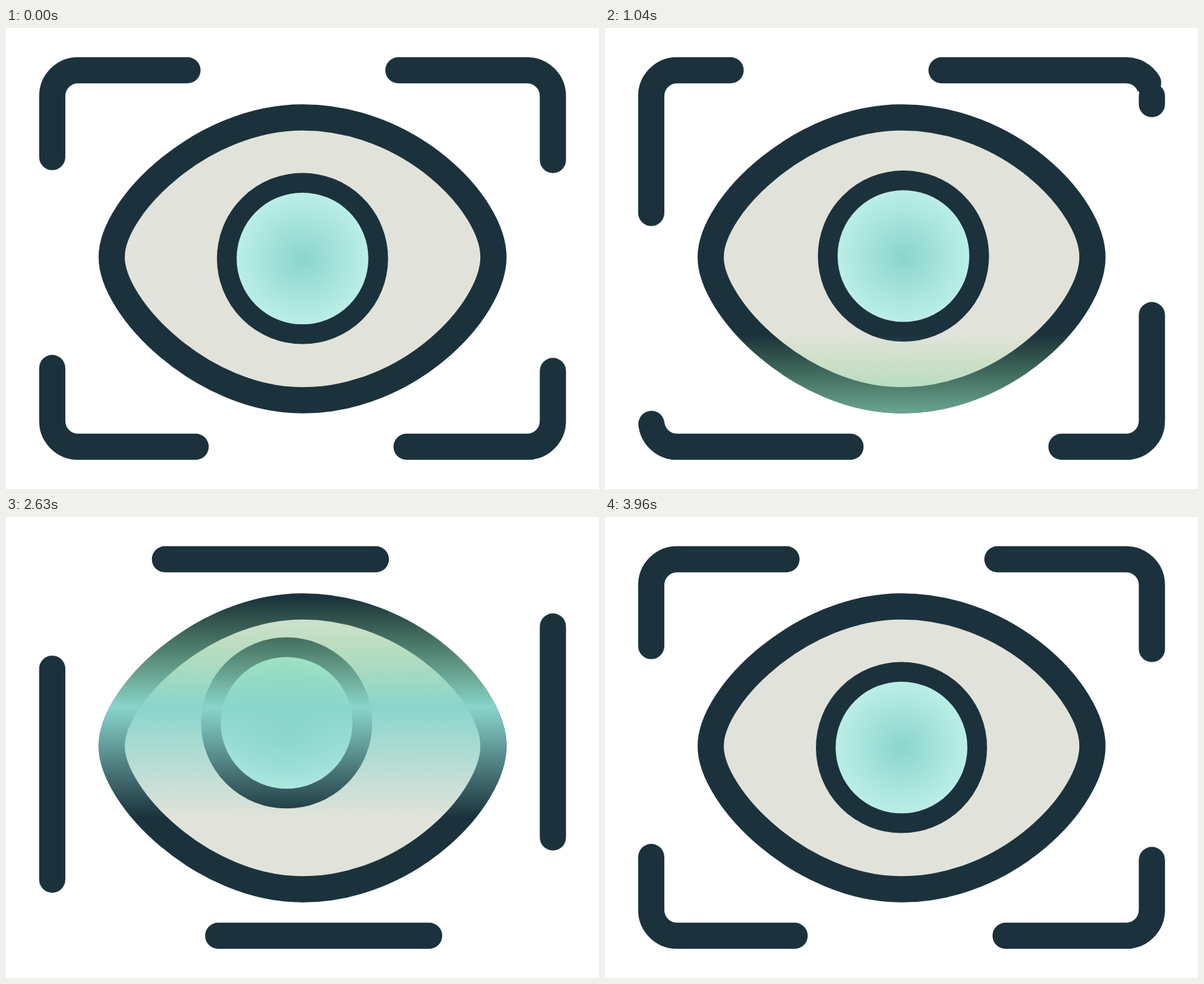
Recreate the animation shown at these times as an HTML page. Size 849 by 660 pixels, loop 4000 ms.

```html
<!DOCTYPE html>
<html lang="en">
<head>
<meta charset="utf-8">
<title>Eye scan</title>
<style>
  html, body { margin: 0; width: 100%; height: 100%; overflow: hidden; background: #fff; }
  svg { display: block; width: 100vw; height: 100vh; }
  .line { fill: none; stroke: #1b323c; stroke-width: 37.5; }
</style>
</head>
<body>
<svg viewBox="0 0 849 660">
  <defs>
    <path id="eye" d="M151.3 328C151.3 255 281 128 424.5 128C578 128 697.9 252 697.9 328C697.9 404 578 533 424.5 533C281 533 151.3 401 151.3 328Z"/>
    <radialGradient id="iris">
      <stop offset="0" stop-color="#8ad5cc"/>
      <stop offset="1" stop-color="#bbeee8"/>
    </radialGradient>
    <linearGradient id="beam" x2="0" y2="1">
      <stop offset="0" stop-color="#8cd782" stop-opacity="0"/>
      <stop offset=".5" stop-color="#89d5cd"/>
      <stop offset="1" stop-color="#89d5cd" stop-opacity="0"/>
    </linearGradient>
    <mask id="inEye" maskUnits="userSpaceOnUse" x="0" y="0" width="849" height="660">
      <use href="#eye" fill="#fff" stroke="#fff" stroke-width="37.5"/>
    </mask>
  </defs>

  <!-- starts below the top right corner and runs clockwise -->
  <path id="frame" class="line" stroke-linecap="round" stroke-dasharray="302"
    d="M783 97.5V562.5A37 37 0 0 1 746 599.5H103.2A37 37 0 0 1 66.2 562.5V97.5A37 37 0 0 1 103.2 60.5H746A37 37 0 0 1 783 97.5Z"/>

  <use href="#eye" fill="#e1e3da"/>
  <g id="pupil">
    <circle r="95" fill="url(#iris)"/>
    <circle r="108.4" fill="none" stroke="#1b323c" stroke-width="28.2"/>
  </g>
  <use href="#eye" class="line"/>
  <g mask="url(#inEye)">
    <rect id="scan" x="120" width="610" height="316" fill="url(#beam)"/>
  </g>
</svg>

<script>
  const FPS = 24, FRAMES = 96;
  const SCANS = [10, 56], SCAN_LENGTH = 30;
  const DASH_PERIOD = 604, DASH_START = 210.5;
  // frame, x, y
  const GAZE = [
    [0, 424.5, 330],
    [20, 462.6, 297.1],
    [40, 392, 355.9],
    [60, 392, 285],
    [80, 462.5, 355.8],
    [95, 424.5, 330]
  ];
  const [frame, pupil, scan] = ['frame', 'pupil', 'scan'].map(id => document.getElementById(id));
  const mix = (a, b, p) => a + (b - a) * p;

  // cubic-bezier(1/3, 0, 0, 1)
  function ease(x) {
    if (x <= 0) return 0;
    if (x >= 1) return 1;
    let lo = 0, hi = 1;
    for (let i = 0; i < 30; i++) {
      const t = (lo + hi) / 2;
      if ((1 - t) ** 2 * t + t ** 3 < x) lo = t; else hi = t;
    }
    return lo * lo * (3 - 2 * lo);
  }

  function gazeAt(f) {
    const i = GAZE.findIndex(k => k[0] > f);
    if (i < 0) return GAZE[GAZE.length - 1].slice(1);
    const [f0, x0, y0] = GAZE[i - 1], [f1, x1, y1] = GAZE[i];
    const p = ease((f - f0) / (f1 - f0));
    return [mix(x0, x1, p), mix(y0, y1, p)];
  }

  function draw(f) {
    const start = f < SCANS[1] ? SCANS[0] : SCANS[1];
    const p = ease((f - start) / SCAN_LENGTH);
    frame.setAttribute('stroke-dashoffset', DASH_START - DASH_PERIOD * (p % 1));
    scan.setAttribute('y', mix(-72.5, 699.5, p) - 158);
    scan.setAttribute('visibility', p > 0 && p < 1 ? 'visible' : 'hidden');
    pupil.setAttribute('transform', `translate(${gazeAt(f)})`);
  }

  const begin = performance.now();
  function tick() {
    const ms = performance.now() - begin;
    draw(Math.floor((ms + 3.4) * FPS / 1000) % FRAMES);
    requestAnimationFrame(tick);
  }
  tick();
</script>
</body>
</html>
```
